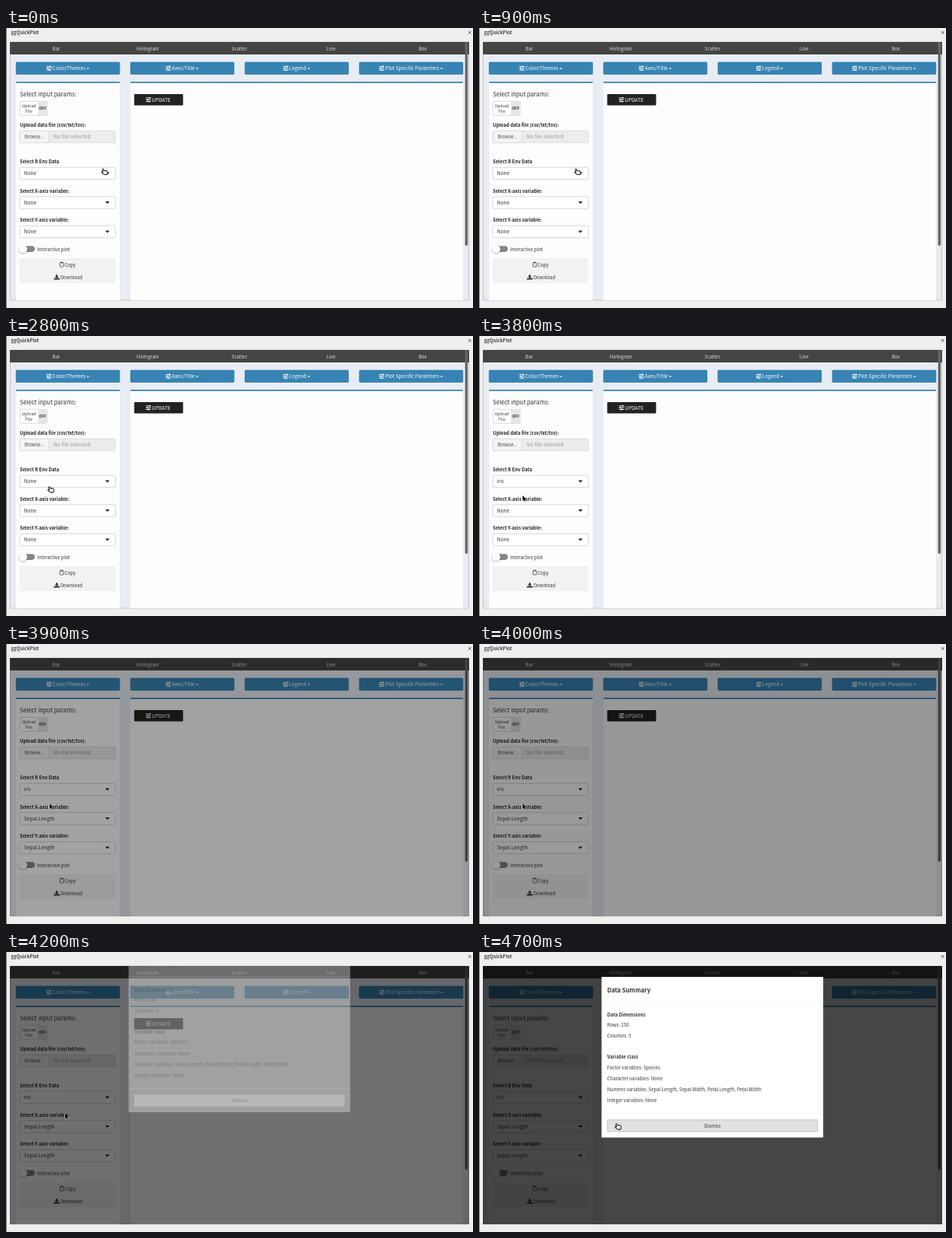
An HTML page with a canvas that plays this animation: 600x360 px, repeating every 5 s.

```html
<!DOCTYPE html>
<html lang="en">
<head>
<meta charset="utf-8">
<title>ggQuickPlot</title>
<style>
  html, body { margin: 0; width: 100%; height: 100%; overflow: hidden; background: #efefef; }
  canvas { display: block; }
</style>
</head>
<body>
<canvas id="stage" width="600" height="360"></canvas>
<script>
const ctx = document.getElementById('stage').getContext('2d');
const LOOP = 5000, STEP = 100;
const FAMILY = '"Noto Sans CJK JP", "Noto Sans CJK SC", "Noto Sans CJK", "Noto Sans", sans-serif';
const BLUE = '#3784b4', INK = '#333';
const BODY = 5.95, FIELD = 6.45;

// Cursor tip: time, x, y
const CURSOR_PATH = [
  [0, 123.5, 181], [1500, 123.5, 181], [1800, 74.5, 220.5], [1900, 74.5, 220.5],
  [2200, 68, 231], [2500, 55.5, 194.5], [2800, 54.5, 193.5], [3000, 54.5, 193.5],
  [3300, 56, 216], [3500, 56, 216], [3700, 56, 205], [4100, 56, 205],
  [4700, 175.5, 220.5], [5000, 175.5, 220.5]
];
const DIM = [[3800, 0], [3900, .36], [4100, .44], [4300, .68], [4400, .72]];
const MODAL = [[4100, 0], [4200, .35], [4300, .75], [4400, .95], [4500, 1]];

const HAND = new Path2D('M.3 .9Q1 -.4 1.8 .7L2.6 2.8Q4.5 2 6.2 2.8Q7.2 3.6 6.8 5.6L6.3 7.5H2.6L-.6 5Q-1 4 .2 4.2L1.3 4.8Z');
const ARROW = new Path2D('M0 0V6.8L1.6 5.4L2.7 7.8L3.8 7.3L2.8 5H5Z');

// Linear interpolation through rows of [time, ...values]
function sample(keys, t) {
  if (t <= keys[0][0]) return keys[0].slice(1);
  const i = keys.findIndex(key => key[0] > t);
  if (i < 0) return keys[keys.length - 1].slice(1);
  const [t0, ...from] = keys[i - 1], [t1, ...to] = keys[i];
  return from.map((v, n) => v + (to[n] - v) * (t - t0) / (t1 - t0));
}

function rect(x, y, w, h, fill, stroke, radius = 0) {
  ctx.beginPath();
  ctx.roundRect(x, y, w, h, radius);
  if (fill) { ctx.fillStyle = fill; ctx.fill(); }
  if (stroke) { ctx.strokeStyle = stroke; ctx.lineWidth = .7; ctx.stroke(); }
}

function text(str, x, y, { size = BODY, color = INK, bold = false, align = 'left' } = {}) {
  ctx.font = `${bold ? 700 : 400} ${size}px ${FAMILY}`;
  ctx.textAlign = align;
  ctx.fillStyle = color;
  ctx.fillText(str, x, y);
  return ctx.measureText(str).width;
}

function caret(x, y, halfWidth, height, color) {
  ctx.fillStyle = color;
  ctx.beginPath();
  ctx.moveTo(x - halfWidth, y);
  ctx.lineTo(x + halfWidth, y);
  ctx.lineTo(x, y + height);
  ctx.fill();
}

function slidersIcon(x, y) {
  [4.2, 1.2, 3].forEach((knob, row) => {
    const lineY = y + (row - 1) * 2.3;
    rect(x, lineY - .45, 6.6, .9, '#fff');
    rect(x + knob, lineY - .95, 1.3, 1.9, '#fff');
  });
}

function menuButton(label, x) {
  rect(x, 44, 133, 15.5, BLUE, '#2f78a6', 1);
  ctx.font = `400 ${FIELD}px ${FAMILY}`;
  const left = x + 66.5 - (ctx.measureText(label).width + 13) / 2;
  slidersIcon(left, 51.8);
  const width = text(label, left + 7.8, 54.1, { size: FIELD, color: '#fff' });
  caret(left + width + 11, 51.4, 1.9, 1.9, '#fff');
}

function selectBox(label, value, y) {
  text(label, 17.7, y - 4.8, { bold: true, color: '#222' });
  rect(17.8, y + .3, 122.6, 15.4, '#fff', '#c8c8c8', 1);
  text(value, 23, y + 10.3, { size: FIELD });
  caret(130.3, y + 6.5, 2.8, 3, '#222');
}

function drawWindow() {
  rect(0, 0, 600, 360, '#efefef');
  rect(0, 0, 1, 360, '#858585');
  text('ggQuickPlot', 6.5, 8.2, { bold: true, color: '#444' });
  ctx.strokeStyle = '#555';
  ctx.lineWidth = 1;
  ctx.beginPath();
  ctx.moveTo(594, 4); ctx.lineTo(597.5, 7.5);
  ctx.moveTo(597.5, 4); ctx.lineTo(594, 7.5);
  ctx.stroke();

  rect(5.5, 18, 589, 332, '#e8edf4', '#b5b5b5');
  rect(5, 18, 590, 16, '#444');
  ['Bar', 'Histogram', 'Scatter', 'Line', 'Box'].forEach((tab, i) =>
    text(tab, 64.5 + i * 117.7, 28.8, { color: '#ddd', align: 'center' }));
  ['Color/Themes', 'Axes/Title', 'Legend', 'Plot Specific Paramters'].forEach((label, i) =>
    menuButton(label, 13 + i * 147));
  for (const [x, width] of [[13, 133], [160, 427]]) {
    rect(x, 69, width, 281, '#fdfdfd');
    rect(x, 69, width, 1.8, BLUE);
  }
  rect(164.7, 85, 62.8, 14.5, '#222', null, 1);
  slidersIcon(179.7, 92.2);
  text('UPDATE', 187.3, 94.7, { size: FIELD, color: '#fff' });
  rect(589.8, 18, 3.4, 262, '#666', null, 1.7);
}

function drawUploader() {
  text('Select input params:', 17.7, 87.8, { size: 7.6 });
  rect(18, 94.3, 35, 18, '#fff', '#ccc', 1);
  rect(41, 94.6, 11.7, 17.4, '#e6e6e6');
  text('Upload', 29.4, 101.6, { size: 5.3, align: 'center' });
  text('File', 29.4, 109.3, { size: 5.3, align: 'center' });
  text('OFF', 47, 105.4, { size: 5, bold: true, align: 'center' });

  text('Upload data file (csv/txt/tsv):', 17.7, 127.2, { bold: true, color: '#222' });
  rect(17.8, 132.3, 122.6, 15.2, '#ececec', '#d6d6d6', 1);
  rect(17.8, 132.3, 37.2, 15.2, '#f4f4f4', '#d6d6d6', 1);
  text('Browse...', 24, 142.3, { color: '#444' });
  text('No file selected', 61, 142.3, { size: 6.7, color: '#999' });
}

function drawSidebarFooter() {
  rect(20, 280.3, 17, 7.6, '#858585', null, 3.8);
  ctx.save();
  ctx.shadowColor = 'rgba(0,0,0,.4)';
  ctx.shadowBlur = 2;
  ctx.shadowOffsetY = .6;
  rect(16.6, 278.8, 10.8, 10.8, '#fff', null, 5.4);
  ctx.restore();
  text('Interactive plot', 40, 286.5);

  rect(17.5, 296, 123, 32, '#f2f2f2');
  rect(69.4, 301.5, 4.4, 5.6, null, INK, .5);
  rect(70.5, 300.8, 2.2, 1.5, INK);
  text('Copy', 75.2, 306.6);
  rect(64.2, 317.2, 2, 2.6, INK);
  caret(65.2, 319.3, 2.6, 2.5, INK);
  rect(61.5, 321.4, 7.4, 2, INK, null, .5);
  text('Download', 70, 322.8);
}

function drawDropdown(hovered) {
  ctx.save();
  ctx.shadowColor = 'rgba(0,0,0,.18)';
  ctx.shadowBlur = 2;
  rect(17.8, 196.8, 122.6, 30.5, '#fff', '#ccc', 1);
  ctx.restore();
  ['None', 'iris'].forEach((item, i) => {
    const y = 199.5 + i * 12.5;
    if (i === hovered) rect(18.2, y, 121.8, 12.5, '#e8ebef');
    text(item, 27, y + 8.5, { size: FIELD });
  });
}

function drawModal(progress) {
  ctx.save();
  ctx.beginPath();
  ctx.rect(5, 18, 590, 332);
  ctx.clip();
  ctx.globalAlpha = progress;
  ctx.translate(0, (progress - 1) * 50);
  rect(157.5, 32, 284.7, 206.5, '#fff');
  text('Data Summary', 164.8, 51.6, { size: 7.6, bold: true });
  rect(157.5, 64.2, 284.7, .6, '#eee');
  text('Data Dimensions', 164.8, 83, { bold: true });
  text('Rows: 150', 164.8, 96.2);
  text('Columns: 5', 164.8, 110.4);
  text('Variable class', 164.8, 137.4, { bold: true });
  ['Factor variables: Species', 'Character variables: None',
   'Numeric variables: Sepal.Length, Sepal.Width, Petal.Length, Petal.Width',
   'Integer variables: None'
  ].forEach((line, i) => text(line, 164.8, 150.8 + i * 14.2));
  rect(157.5, 207.5, 284.7, .6, '#eee');
  rect(165, 215.8, 270, 15.2, '#e1e1e1', '#b4b4b4');
  text('Dismiss', 300, 225.7, { align: 'center' });
  ctx.restore();
}

function drawCursor(t) {
  const [x, y] = sample(CURSOR_PATH, t);
  const isArrow = (t >= 2100 && t < 2400) || (t >= 3600 && t < 4600);
  const shape = isArrow ? ARROW : HAND;
  ctx.save();
  ctx.translate(x, y);
  ctx.lineWidth = .9;
  ctx.lineJoin = 'round';
  ctx.strokeStyle = isArrow ? '#fff' : '#111';
  ctx.fillStyle = isArrow ? '#000' : '#fff';
  ctx.stroke(shape);
  ctx.fill(shape);
  if (!isArrow) ctx.stroke(shape);
  ctx.restore();
}

function draw(t) {
  const variable = t >= 3900 ? 'Sepal.Length' : 'None';
  drawWindow();
  drawUploader();
  selectBox('Select R Env Data', t >= 3500 ? 'iris' : 'None', 179);
  selectBox('Select X-axis variable:', variable, 216.5);
  selectBox('Select Y-axis variable:', variable, 254);
  drawSidebarFooter();
  if (t >= 3000 && t < 3500) drawDropdown(t >= 3200 ? 1 : 0);

  const [dim] = sample(DIM, t), [modal] = sample(MODAL, t);
  if (dim) rect(5, 18, 590, 332, `rgba(0,0,0,${dim})`);
  if (modal) drawModal(modal);
  drawCursor(t);
}

const start = performance.now();
function tick() {
  const t = (performance.now() - start) % LOOP;
  draw(Math.floor(t / STEP) * STEP);
  requestAnimationFrame(tick);
}
tick();
</script>
</body>
</html>
```
